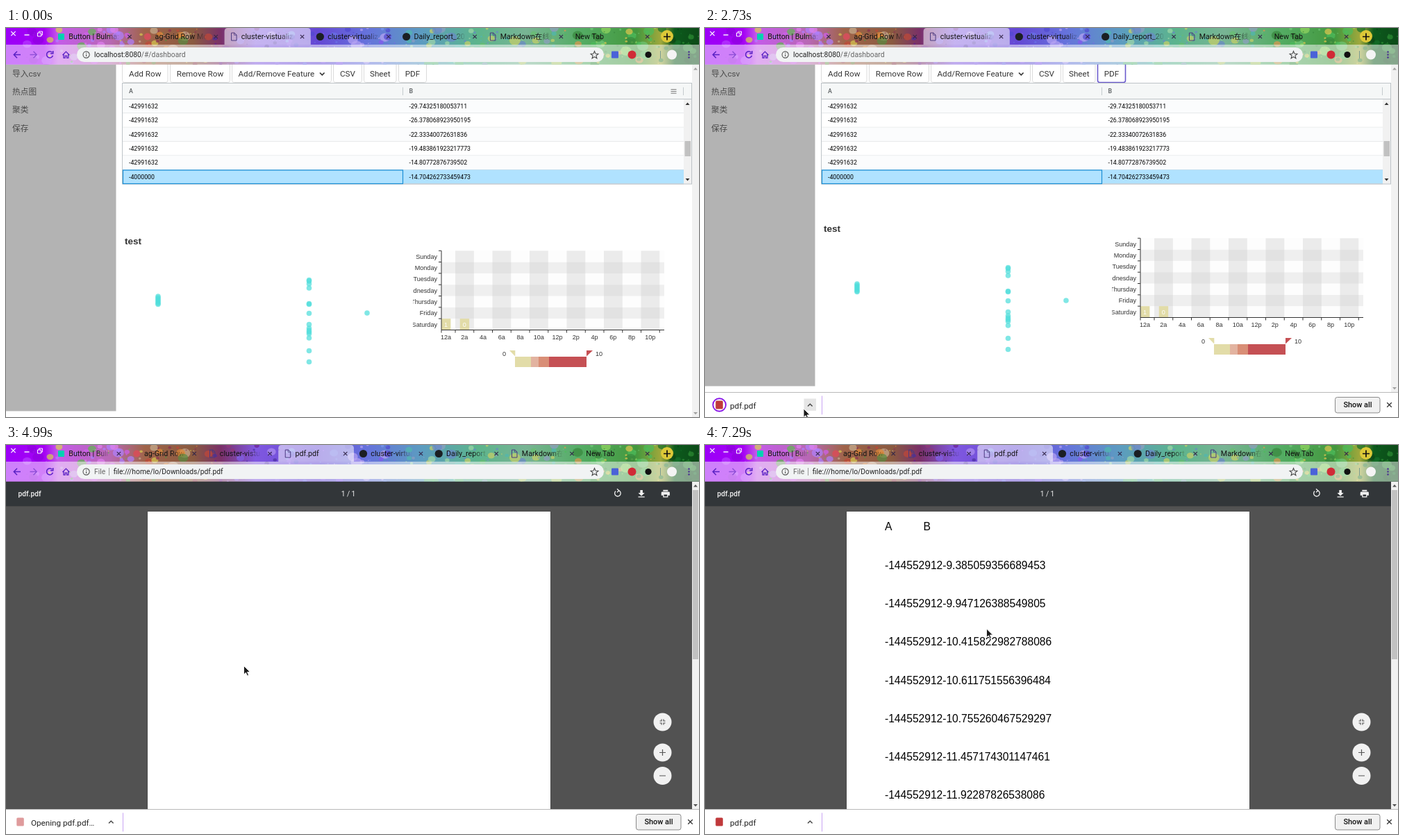
An HTML page for the animation above (8000 ms loop, 998 by 561 pixels).

```html
<!DOCTYPE html>
<html>
<head>
<meta charset="utf-8">
<style>
html, body { margin: 0; width: 100%; height: 100%; overflow: hidden; background: #fff; }
svg { display: block; }
text { font-family: Roboto, "Noto Sans CJK SC", "Noto Sans CJK", sans-serif; white-space: pre; }
.arial { font-family: "Liberation Sans", Arial, sans-serif; }
</style>
</head>
<body>
<svg id="stage" width="998" height="561" viewBox="0 0 998 561"></svg>
<script>
const LOOP = 8000;
const PURPLE = '#5a22c4';

// ---- drawing helpers ----
const rect = (x, y, w, h, fill, more = '') =>
  `<rect x="${x}" y="${y}" width="${w}" height="${h}" fill="${fill}" ${more}/>`;
const disc = (x, y, r, fill, more = '') => `<circle cx="${x}" cy="${y}" r="${r}" fill="${fill}" ${more}/>`;
const line = (d, stroke, w = 1, more = '') => `<path d="${d}" fill="none" stroke="${stroke}" stroke-width="${w}" ${more}/>`;
const shape = (d, fill, more = '') => `<path d="${d}" fill="${fill}" ${more}/>`;
// text is placed by its vertical middle
const text = (x, y, str, size, fill = '#222', more = '') =>
  `<text x="${x}" y="${y + size * .355}" font-size="${size}" fill="${fill}" ${more}>${str}</text>`;
const group = (id, body, more = '') => `<g id="${id}" ${more}>${body}</g>`;
const cross = (x, y, r, color, w = 1.2) =>
  line(`M${x - r} ${y - r}l${2 * r} ${2 * r}m0 ${-2 * r}l${-2 * r} ${2 * r}`, color, w);
const MID = 'text-anchor="middle"', END = 'text-anchor="end"', ARIAL = 'class="arial"';
const range = n => [...Array(n).keys()];

// ---- painted window theme ----
function theme() {
  const stops = ['0 #9c00f8', '.055 #a400f4', '.075 #c45ce8', '.15 #b868b4', '.2 #a0644a', '.27 #8a5a40',
    '.31 #7a3068', '.36 #8058e0', '.45 #6448d4', '.52 #6672dc', '.6 #5c9cc0', '.68 #5cb48c',
    '.75 #78b494', '.83 #54ac64', '.91 #44983e', '.945 #a0a83c', '.965 #0c5a1c', '1 #0c4a18'].map(s => {
      const [at, color] = s.split(' ');
      return `<stop offset="${at}" stop-color="${color}"/>`;
    }).join('');
  const zones = [
    [60, '#b53cff #9000e0'],
    [180, '#d8d050 #60b850 #e080f0 #d060f0 #b080ff #c8a0e8'],
    [300, '#e08838 #c04838 #5a8a40 #d8c850 #8a3050 #c8b090'],
    [400, '#6a2090 #903878 #8060e8 #b090f0 #4a30a0'],
    [570, '#8858f0 #5048d0 #b8a4f4 #6a74e8 #7a98f0'],
    [800, '#50b8b0 #68c070 #c8d068 #6a88c8 #90a0c0 #a0d8a8'],
    [940, '#4cbc5c #38883c #e0c850 #94d860 #e09850 #70c878'],
    [998, '#0a4416 #14702a #2c8c34']];
  let seed = 11, out = '';
  const rnd = () => (seed = seed * 16807 % 2147483647) / 2147483647;
  for (let i = 0; i < 480; i++) {
    const x = 30 + rnd() * 968, y = rnd() * 53, r = .8 + rnd() ** 3 * 6;
    const colors = zones.find(z => x <= z[0])[1].split(' ');
    const fill = colors[Math.floor(rnd() * colors.length)];
    out += `<ellipse cx="${x.toFixed(1)}" cy="${y.toFixed(1)}" rx="${(r * 1.2).toFixed(1)}" ry="${r.toFixed(1)}" fill="${fill}" opacity=".7"/>`;
  }
  return `<defs><linearGradient id="paint">${stops}</linearGradient>
    <linearGradient id="fade" gradientUnits="userSpaceOnUse"><stop offset="0" stop-color="#111"/><stop offset="1" stop-color="#111" stop-opacity="0"/></linearGradient>
    <clipPath id="strip">${rect(0, 0, 998, 52.5, '#000')}</clipPath>
    <clipPath id="pdfView">${rect(0, 88, 988, 437, '#000')}</clipPath>
    <clipPath id="chartView">${rect(586, 280, 402, 240, '#000')}</clipPath></defs>
    <g clip-path="url(#strip)">${rect(0, 0, 998, 53, 'url(#paint)')}${out}${disc(952, 12, 9, '#dcc838')}</g>`;
}

// ---- tab strip and address bar ----
const docIcon = shape('M10-5.5h4.5l3 3v8H10z', 'none', 'stroke="#4a3a80"') + line('M14-5.5v3.2h3.4', '#4a3a80', .8);
const darkDot = disc(13.5, 0, 5.6, '#1b1f23');
const tabs = [
  ['Button | Bulma: Free', rect(9, -4.5, 9, 9, '#00d1b2', 'rx="1"')],
  ['ag-Grid Row Model', disc(13.5, 0, 5, '#d2505a')],
  ['cluster-vistualization', docIcon],
  ['pdf.pdf', docIcon],
  ['cluster-virtualization', darkDot],
  ['Daily_report_2019', darkDot],
  ['Markdown在线编辑', docIcon],
  ['New Tab', '']];

const tabStrip = () => cross(10.5, 8, 3.2, '#fff') + line('M26.5 10h7', '#fff', 1.4) +
  line('M47.5 6.5v-1.5h5v5h-1.5M45.5 7h5v5h-5z', '#fff') +
  rect(0, 24, 998, 28.5, '#fff', 'opacity=".5"') +
  shape('', '#fff', 'id="active" opacity=".55"') +
  tabs.map(([title, icon]) => `<svg class="tab" height="24" overflow="hidden">
    <g transform="translate(0 12.5)">${icon}${text(icon ? 24.3 : 8, 0, title, 10.7, 'url(#fade)')}</g>
    <g class="close">${cross(0, 12.5, 2.7, '#33264a', 1.1)}</g></svg>`).join('') +
  line('M947 12.5h10m-5-5v10', '#111', 1.7);

const toolbar = () =>
  line('M21 38.5H11.5m4.5-4.7l-4.7 4.7l4.7 4.7', PURPLE, 1.5) +
  line('M34.5 38.5H44m-4.5-4.7l4.7 4.7l-4.7 4.7', '#9050d8', 1.5) +
  line('M66.5 35.2a4.6 4.6 0 1 0 1 4.6M67.8 33v3.7h-3.7', PURPLE, 1.5) +
  line('M81.5 39l4.9-4.9l4.9 4.9M83 38v5.2h2.2v-3h2.4v3h2.2V38', PURPLE, 1.3) +
  rect(102, 28, 759, 21, '#f1f3f4', 'rx="10.5"') +
  line('M111 38.5a4.6 4.6 0 1 1 9.2 0a4.6 4.6 0 1 1-9.2 0M115.6 38v3M115.6 35.8v1.2', '#555', 1.1) +
  group('webUrl', text(127, 38.5, 'localhost:8080<tspan fill="#666">/#/dashboard</tspan>', 10.3)) +
  group('fileUrl', text(127, 38.5, 'File', 10.3, '#666') + line('M148.5 33v11', '#999') +
    text(154.7, 38.5, 'file:///home/lo/Downloads/pdf.pdf', 10.3)) +
  line('M847.5 33.5l1.5 3.6l3.9.3l-3 2.5l1 3.8l-3.4-2.1l-3.4 2.1l1-3.8l-3-2.5l3.9-.3z', '#444', 1.1) +
  rect(872, 33.5, 10, 10, '#4a62d8', 'rx="1"') + disc(901.5, 38.5, 6, '#d02a36') + disc(925, 38.5, 4.6, '#111') +
  line('M942.5 33v11', '#7a9a90') + disc(959, 38.5, 7, '#f4f4f4') +
  [34.5, 38.5, 42.5].map(y => disc(983.5, y, 1.2, '#4a3090')).join('');

// ---- dashboard ----
function table() {
  const values = ['-29.74325180053711', '-26.378068923950195', '-22.33340072631836',
    '-19.483861923217773', '-14.80772876739502', '-14.704262733459473'];
  const rows = values.map((v, i) => {
    const y = 102.5 + i * 20.4, last = i === 5;
    return rect(168, y, 808, 20.4, last ? '#b0e2ff' : i % 2 ? '#fff' : '#fbfcfd') +
      line(`M168 ${y + 20.4}H976`, '#d5d9dc') +
      text(177, y + 10.2, last ? '-4000000' : '-42991632', 8.77, '#000') + text(580.5, y + 10.2, v, 8.77, '#000');
  }).join('');
  return rect(168, 79.5, 820, 23, '#f5f7f7') + rows + line('M168 102.5H988', '#bdc3c7') +
    text(177, 91, 'A', 8.77, '#6c7072', 'font-weight="700"') + text(580.5, 91, 'B', 8.77, '#6c7072', 'font-weight="700"') +
    line('M571.5 85.5v11.5M975.5 85.5v11.5', '#c5cbce') +
    group('menu', line('M957.5 88.7h8M957.5 91.4h8M957.5 94.1h8', '#777')) +
    rect(976, 103, 11.5, 122, '#f1f1f1') + rect(977.5, 163, 8.5, 22, '#c1c1c1') +
    shape('M978.5 111h6l-3-3.5z', '#333') + shape('M978.5 217h6l-3 3.5z', '#333') +
    rect(167.5, 79.5, 820, 145.5, 'none', 'stroke="#bdc3c7"') +
    rect(168.5, 205, 403, 19.5, 'none', 'stroke="#1b8fd6" stroke-width="1.2"');
}

function buttons() {
  const items = [[167.5, 65.5, 'Add Row'], [236.5, 86, 'Remove Row'], [325.5, 143, 'Add/Remove Feature'],
    [471.5, 41, 'CSV'], [515.5, 46.5, 'Sheet'], [565.5, 40, 'PDF']];
  return items.map(([x, w, label], i) =>
    rect(x, 50, w, 28.5, '#fff', `rx="3" stroke="#dbdbdb" ${i === 5 ? 'id="pdfButton"' : ''}`) +
    text(i === 2 ? 334.5 : x + w / 2, 65.5, label, 11.69, '#363636', i === 2 ? '' : MID)).join('') +
    line('M452 64.5l3.3 3.3l3.3-3.3', '#363636', 1.7);
}

function charts() {
  const dots = [[219, [387, 389, 391, 393, 395, 397, 398.5]],
    [436.5, [363.5, 365, 369, 375, 397.5, 398.5, 411.5, 427.5, 433, 436, 438.5, 441, 447, 465.5, 481.5]],
    [520, [411]]].map(([x, ys]) => ys.map(y => disc(x, y, 3.8, '#4fdedb', 'opacity=".72"')).join('')).join('');
  const L = 627, B = 435.5, H = 16.33, W = 26.75, S = 114.3;
  const days = ['Saturday', 'Friday', 'Thursday', 'Wednesday', 'Tuesday', 'Monday', 'Sunday'];
  const label = (x, y, s, anchor = MID, color = '#333') => text(x, y, s, 9.1, color, `${ARIAL} ${anchor}`);
  const left = i => i ? L + 20 + (i - 1) * W : L;
  const rows = days.map((d, i) => rect(L, B - (i + 1) * H, 321, H, i % 2 ? '#efefef' : '#fdfdfd') +
    line(`M${L} ${B - (i + 1) * H}h-4`, '#333') + label(621, B - (i + .5) * H, d, END)).join('');
  const cols = range(13).map(i =>
    (i % 2 ? rect(left(i), B - S, W, S, 'rgba(200,200,200,.35)') : '') +
    line(`M${left(i)} ${B}v4`, '#333')).join('');
  const hours = ['12a', '2a', '4a', '6a', '8a', '10a', '12p', '2p', '4p', '6p', '8p', '10p']
    .map((h, i) => label(633.5 + i * W, 445.5, h)).join('');
  const cell = (x, n) => rect(x, B - H, 13.4, H, '#e2dca8') + label(x + 6.5, B - H / 2, n, MID, '#fff');
  const scale = [[733, 23, '#e2dca8'], [756, 11, '#e2b3a0'], [767, 15, '#d98e76'], [782, 54, '#c55054']]
    .map(([x, w, c]) => rect(x, 474, w, 15, c)).join('') +
    shape('M725 465h8.3v8.5z', '#e2dca8') + shape('M836 465h9l-9 8.5z', '#c55054') +
    label(717.5, 469.5, '0') + label(854, 469.5, '10');
  return text(171, 307.5, 'test', 13.5, '#333', `${ARIAL} font-weight="700"`) + dots +
    `<g clip-path="url(#chartView)">${rows}${cols}${cell(L, 1)}${cell(L + W, 0)}
    ${line(`M${L} ${B - S}V${B}H948`, '#333')}${hours}${scale}</g>`;
}

const dashboard = () => rect(0, 53, 998, 508, '#fff') + rect(0, 52.5, 158.5, 500, '#b3b3b3', 'id="side"') +
  ['导入csv', '热点图', '聚类', '保存'].map((s, i) => text(9, 65.5 + i * 26.3, s, 11.69, '#4a4a4a')).join('') +
  buttons() + table() + group('charts', charts()) +
  rect(988, 53, 10, 508, '#f1f1f1') + shape('M990 60.5h6l-3-3.5z', '#a3a3a3') +
  shape('M990-7h6l-3 3.5z', '#a3a3a3', 'id="downArrow"');

// ---- document viewer ----
function viewer() {
  const values = ['9.385059356689453', '9.947126388549805', '10.415822982788086', '10.611751556396484',
    '10.755260467529297', '11.457174301147461', '11.92287826538086', '11.954050064086914', '11.992218017578125',
    '11.822956085205078', '11.562557220458984', '10.565570831298828', '9.933134078979492', '9.976672172546387'];
  const row = (x, i, s) => text(x, 117.9 + i * 55.27, s, 15.6, '#000', ARIAL);
  const sheet = rect(203.5, 95.5, 581, 821, '#444') + rect(204, 96, 580, 820, '#fff') +
    group('sheetText', row(259, 0, 'A') + row(314.5, 0, 'B') +
      values.map((v, i) => row(259, i + 1, '-144552912-' + v)).join(''));
  const knob = y => disc(950.5, y, 13, '#f1f1f1');
  const knobs = knob(399.5) + knob(443.5) + knob(477) +
    line('M946.5 398h2.5v-2.5m3 0v2.5h2.5m0 3h-2.5v2.5m-3 0v-2.5h-2.5', '#555', 1.2) +
    line('M946 443.5h9m-4.5-4.5v9M946 477h9', '#555', 1.2);
  const tools = line('M878 66.5a4.3 4.3 0 1 0 4.5-.8M880 63.2l2.8 2.5l-2.8 2.5', '#f1f1f1', 1.3) +
    shape('M913.3 65h3.6v4h2.8l-4.6 4.5l-4.6-4.5h2.8zM910.5 74.2h9.2v1.3h-9.2z', '#f1f1f1') +
    shape('M946.3 64.8h7v2h-7zM945 67.5h9.6a1.3 1.3 0 0 1 1.3 1.3v4h-2.5v2.7h-7.2v-2.7h-2.5v-4a1.3 1.3 0 0 1 1.3-1.3z', '#f1f1f1') +
    rect(947.5, 71.5, 4.6, 2.7, '#323639');
  return rect(0, 52.5, 998, 473, '#525252') + group('sheetBox', group('sheet', sheet), 'clip-path="url(#pdfView)"') +
    group('knobs', knobs) +
    group('pdfBar', rect(0, 52.5, 998, 35.5, '#323639') + rect(0, 88, 998, 1, '#000', 'opacity=".12"') +
      text(17.5, 70.5, 'pdf.pdf', 10.2, '#f1f1f1', 'font-weight="500"') +
      group('pageNo', text(493, 70.5, '1 / 1', 10.2, '#f1f1f1', MID)) + group('tools', tools)) +
    group('pdfScroll', rect(988, 53, 10, 472, '#f1f1f1') + rect(989, 65, 8, 244, '#c1c1c1', 'id="thumb"') +
      shape('M990 60.5h6l-3-3.5z', '#555') + shape('M990 518h6l-3 3.5z', '#555'));
}

// ---- download shelf ----
const shelf = () => rect(0, 525, 998, 36, '#fff') + line('M0 525.5H998', '#b8b8b8') +
  `<svg id="item" x="0" y="525" height="36" overflow="hidden">
    ${rect(15.3, 12.5, 10.5, 12, '#c0393b', 'rx="1.5" id="fileIcon"')}
    ${disc(20.7, 18.5, 9.3, 'none', 'stroke="#8a18e8" stroke-width="1.9" id="ring"')}
    ${text(36, 20, 'pdf.pdf', 11.7, '#222', 'id="fileName"')}</svg>` +
  group('itemEnd', rect(-26, 534.5, 17.5, 17.5, '#e6e6e6', 'id="hover"') +
    line('M-20.5 545.5l3.3-3.3l3.3 3.3', '#444', 1.4) + line('M0 530.5v27', '#c9a4f4')) +
  rect(907.5, 532.5, 64.5, 22.5, '#f1f1f1', 'rx="3" stroke="#8a8a8a"') +
  text(940, 543.5, 'Show all', 10.9, '#111', `${MID} font-weight="500"`) + cross(985.5, 543.5, 3.3, '#333', 1.3);

const badge = () => disc(0, 0, 26, '#e4e4e4') +
  shape('M-3.5-10h7v7h5L0 5.5L-8.5-3h5z', '#5a78e0') + rect(-12, 15, 24, 2.6, '#5a78e0');

function cursors() {
  const outline = 'stroke="#fff" stroke-width=".9"';
  const beam = 'M-2.5-5.5q2.5 0 2.5 1.5v8q0 1.5-2.5 1.5M2.5-5.5Q0-5.5 0-4v8q0 1.5 2.5 1.5';
  return group('arrow', shape('M0 0V12.5l2.9-2.7l2 4.5l2.1-.9l-2-4.4h4z', '#1a1a1a', outline)) +
    group('hand', shape('M0 0c1-1 2 0 2 1v4.2l5 1c1.3.4 1.8 1 1.6 2.3l-.8 4.3H1.5L-3 7.5c0-1.3 1.5-1.3 3-.2z', '#1a1a1a', outline)) +
    group('beam', line(beam, '#fff', 2.2) + line(beam, '#222'));
}

const stage = document.getElementById('stage');
stage.innerHTML = group('dash', dashboard()) + group('viewer', viewer()) + group('badge', badge()) +
  group('shelf', shelf()) + theme() + tabStrip() + toolbar() + cursors();

// ---- motion ----
const $ = id => document.getElementById(id);
const set = (id, name, value) => $(id).setAttribute(name, value);
const show = (id, on) => set(id, 'display', on ? 'inline' : 'none');
const move = (id, x, y) => set(id, 'transform', `translate(${x} ${y})`);
const clamp = v => Math.max(0, Math.min(1, v));
const span = (t, a, b) => clamp((t - a) / (b - a));
const mix = (a, b, p) => a + (b - a) * p;
const linear = p => p, easeIn = p => p * p, easeOut = p => 1 - (1 - p) ** 2, smooth = p => p * p * (3 - 2 * p);
const smoother = p => p ** 3 * (p * (6 * p - 15) + 10);
// progress in n visible steps, from a to b
const stepped = (t, a, b, n) => Math.floor(span(t, a, b) * (n - 1) + .01) / (n - 1);

const path = [
  [50, 360, 622, 76, 586.5, 69.5, easeOut],
  [1260, 1630, 586.5, 69.5, 397, 374, easeIn],
  [1630, 2430, 397, 374, 142, 549, easeOut],
  [2750, 3330, 142, 549, 84, 545, smooth],
  [3790, 4520, 84, 545, 342.5, 318.5, smooth],
  [5560, 5720, 342.5, 318.5, 406, 275, smooth],
  [7240, 7241, 406, 275, 405.5, 265, linear]];

function pointer(t) {
  const [a, b, x0, y0, x1, y1, ease] = path.filter(k => k[0] <= t).pop() || path[0];
  const p = ease(span(t, a, b));
  const kind = t < 50 ? '' : t >= 560 && t < 1290 ? 'hand' : t >= 5660 && t < 7240 ? 'beam' : 'arrow';
  for (const id of ['arrow', 'hand', 'beam']) show(id, id === kind);
  if (kind) move(kind, mix(x0, x1, p), mix(y0, y1, p));
}

function layTabs(t) {
  const fresh = 108.8 * easeOut(span(t, 3940, 4190)), w = (870 - fresh) / 7;
  const open = t >= 3940;
  let x = 66;
  document.querySelectorAll('.tab').forEach((tab, i) => {
    const width = i === 3 ? fresh : w;
    tab.setAttribute('x', x);
    tab.setAttribute('width', Math.max(width, .01));
    tab.querySelector('.close').setAttribute('transform', `translate(${width - 12.3} 0)`);
    if (i === (open ? 3 : 2)) {
      const r = Math.min(5, width / 2);
      set('active', 'd', `M${x} 24V${r}q0-${r} ${r}-${r}h${width - 2 * r}q${r} 0 ${r} ${r}V24z`);
    }
    x += width;
  });
  set('fade', 'x1', w - 46);
  set('fade', 'x2', w - 25);
  show('webUrl', !open);
  show('fileUrl', open);
}

function render(t) {
  const up = easeOut(span(t, 900, 1130)), bottom = 561 - 36 * up;
  set('menu', 'opacity', 1 - span(t, 50, 360));
  const pressed = t >= 870;
  set('pdfButton', 'stroke', pressed ? '#6a5acd' : t >= 310 ? '#b5b5b5' : '#dbdbdb');
  set('pdfButton', 'stroke-width', pressed ? 1.6 : 1);
  set('side', 'height', bottom - 61);
  move('charts', 0, (bottom - 561) / 2);
  move('downArrow', 0, bottom);

  const fall = span(t, 880, 1240);
  show('badge', fall > 0 && fall < 1);
  move('badge', 26, 446 + 52.5 * fall);
  set('badge', 'opacity', clamp((1 - fall) * 10) * clamp(fall * 5));

  show('shelf', up > 0);
  move('shelf', 0, 36 * (1 - up));
  const width = 168.5 * easeOut(span(t, 1156, 1456)), opening = t >= 3790 && t < 6740;
  set('item', 'width', Math.max(width, .01));
  show('itemEnd', width > 0);
  move('itemEnd', width, 0);
  show('hover', t >= 2380 && t < 2860);
  set('ring', 'opacity', t > 3110 ? 0 : .5 + .5 * Math.cos((t - 1210) / 760 * 2 * Math.PI));
  set('fileIcon', 'opacity', opening ? .5 : 1);
  const name = opening ? 'Opening pdf.pdf…' : 'pdf.pdf';
  if ($('fileName').textContent !== name) $('fileName').textContent = name;

  layTabs(t);
  const loaded = t >= 4940;
  show('dash', t < 4000);
  show('viewer', t >= 4000);
  show('pdfBar', t >= 4780);
  show('sheetBox', loaded);
  show('pdfScroll', loaded);
  show('sheetText', t >= 5040);
  move('knobs', loaded ? -5 : 0, 0);
  move('pageNo', loaded ? 0 : 5, 0);
  move('tools', loaded ? 0 : 10, 0);
  const scroll = 391.6 * (smoother(stepped(t, 6100, 6470, 8)) - smooth(stepped(t, 7030, 7290, 6)));
  move('sheet', 0, -scroll);
  set('thumb', 'y', 65 + scroll * .5255);
  pointer(t);
}

const begin = performance.now();
function tick() {
  render((performance.now() - begin) % LOOP);
  requestAnimationFrame(tick);
}
tick();
</script>
</body>
</html>
```
